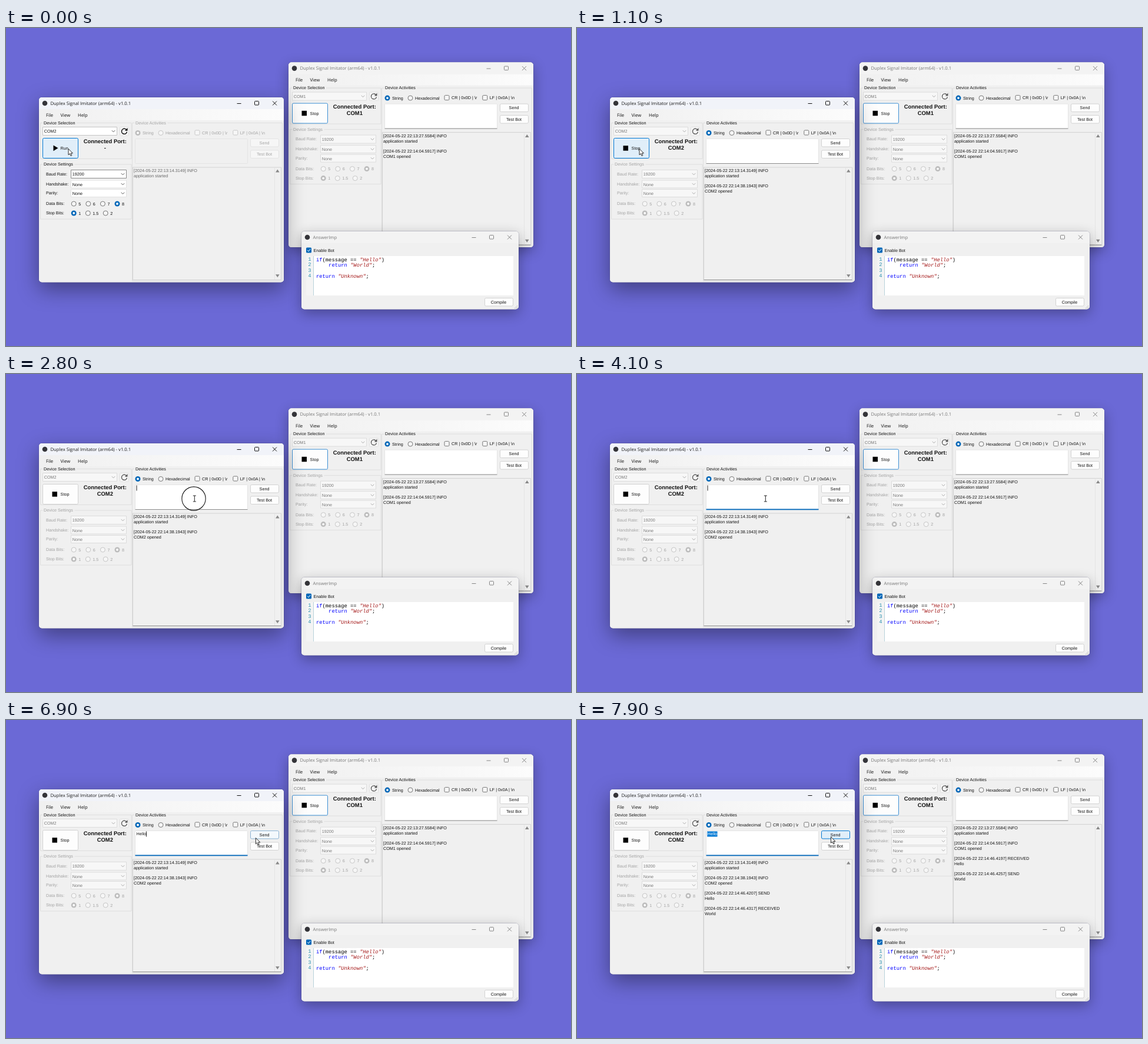
An HTML page with a canvas that plays this animation: 960 by 541 pixels, repeating every 8 s.

```html
<!DOCTYPE html>
<html lang="en">
<head>
<meta charset="utf-8">
<title>Serial port demo</title>
<style>
html, body { margin: 0; width: 100%; height: 100%; overflow: hidden; background: #6b69d6; }
canvas { display: block; }
</style>
</head>
<body>
<canvas id="stage" width="960" height="541"></canvas>
<script>
const c = document.getElementById('stage').getContext('2d');
c.textRendering = 'geometricPrecision';
const LOOP = 8000;
const UI = '7.2px "Liberation Sans", Arial, sans-serif';
const BOLD = 'bold 9.4px "Liberation Sans", Arial, sans-serif';
const TITLE = '7.7px "Open Sans", sans-serif';
const CODE = '8.8px "Liberation Mono", monospace';
const BLUE = '#0067b8', OFF = '#a3a3a3', INK = '#111';

const clamp = v => Math.max(0, Math.min(1, v));
const smooth = v => (v = clamp(v), v * v * (3 - 2 * v));
const between = (t, a, b) => t >= a && t < b;

function text(s, x, y, color = INK, font = UI, align = 'left') {
  c.font = font;
  c.fillStyle = color;
  c.textAlign = align;
  c.fillText(s, x, y);
}

function rect(x, y, w, h, color) {
  c.fillStyle = color;
  c.fillRect(x, y, w, h);
}

function box(x, y, w, h, fill, stroke, r = 0) {
  c.beginPath();
  c.roundRect(x, y, w, h, r);
  if (fill) { c.fillStyle = fill; c.fill(); }
  if (stroke) { c.strokeStyle = stroke; c.lineWidth = 1; c.stroke(); }
}

function line(color, width, ...p) {
  c.beginPath();
  for (let i = 0; i < p.length; i += 2) c.lineTo(p[i], p[i + 1]);
  c.strokeStyle = color;
  c.lineWidth = width;
  c.stroke();
}

function shape(fill, ...p) {
  c.beginPath();
  for (let i = 0; i < p.length; i += 2) c.lineTo(p[i], p[i + 1]);
  c.closePath();
  c.fillStyle = fill;
  c.fill();
}

function circle(x, y, r, fill, stroke, width = 1) {
  c.beginPath();
  c.arc(x, y, r, 0, 7);
  if (fill) { c.fillStyle = fill; c.fill(); }
  if (stroke) { c.strokeStyle = stroke; c.lineWidth = width; c.stroke(); }
}

function frame(x, y, w, h, title, active) {
  c.save();
  c.shadowColor = active ? 'rgba(0,0,0,.4)' : 'rgba(0,0,0,.32)';
  c.shadowBlur = active ? 36 : 22;
  c.shadowOffsetY = active ? 12 : 7;
  box(x, y, w, h, '#f0f0f0', null, 5);
  c.restore();
  box(x - .2, y - .2, w + .4, h + .4, null, 'rgba(70,70,110,.3)', 5);
  box(x, y, w, h, '#f0f0f0', null, 5);
  box(x, y, w, 20, active ? '#f1f3f9' : '#f3f3f3', null, [5, 5, 0, 0]);
  const ink = active ? INK : '#858585', b = x + w;
  circle(x + 10, y + 10, 4.3, '#35353a');
  text(title, x + 19.5, y + 12.8, active ? '#1a1a1a' : '#777', TITLE);
  line(ink, 1, b - 79.5, y + 10.5, b - 72.5, y + 10.5);
  box(b - 49.5, y + 6.5, 7, 6.5, null, ink, 1);
  line(ink, 1, b - 19, y + 6.5, b - 12, y + 13.5);
  line(ink, 1, b - 12, y + 6.5, b - 19, y + 13.5);
}

function group(x, y, w, h, label, on = true) {
  box(x, y, w, h, null, '#dedede');
  c.font = UI;
  rect(x + 4, y - 3, c.measureText(label).width + 4, 6, '#f0f0f0');
  text(label, x + 5.5, y + 2.3, on ? INK : OFF);
}

function chevron(x, y, on) {
  line(on ? '#555' : '#aaa', 1, x - 2.7, y - 1.3, x, y + 1.4, x + 2.7, y - 1.3);
}

function combo(x, y, w, h, value, on, border) {
  box(x, y, w, h, on ? '#fff' : '#f7f7f7', on ? border : '#dcdcdc');
  text(value, x + 2.3, y + 9.5, on ? INK : '#777');
  chevron(x + w - 6, y + h / 2, on);
}

function radio(x, y, label, checked, on = true) {
  if (checked) {
    circle(x, y, 4.5, on ? BLUE : '#bdbdbd');
    circle(x, y, 1.9, '#fff');
  } else circle(x, y, 4, '#f6f6f6', on ? '#777' : '#c6c6c6');
  text(label, x + 8, y + 2.7, on ? INK : OFF);
}

function check(x, y, label, on) {
  box(x - 4, y - 4, 8, 8, '#f7f7f7', on ? '#777' : '#c6c6c6', 1.5);
  text(label, x + 8, y + 2.7, on ? INK : OFF);
}

function button(x, y, w, h, label, on = true, fill = '#fdfdfd', border = '#d2d2d2') {
  box(x, y, w, h, on ? fill : '#f6f6f6', on ? border : '#e3e3e3', 2);
  if (label) text(label, x + w / 2 - .5, y + h / 2 + 2.6, on ? INK : OFF, UI, 'center');
}

// Coordinates are those of the left window; dx, dy move the whole window.
function emulator(dx, dy, s) {
  c.save();
  c.translate(dx, dy);
  const open = s.open, idle = !open;
  frame(56, 118, 416, 314.5, 'Duplex Signal Imitator (arm64) - v1.0.1', s.active);
  const strip = c.createLinearGradient(56, 0, 472, 0);
  strip.addColorStop(0, '#f0f0f0');
  strip.addColorStop(1, '#fcfcfc');
  rect(56, 138, 416, 19, strip);
  [['File', 68], ['View', 92.5], ['Help', 122]].forEach(([m, x]) => text(m, x, 150.8, INK, TITLE));

  group(58.5, 161.5, 154.5, 61, 'Device Selection');
  combo(62.5, 168.5, 126, 14, s.port, idle, '#c4c4c4');
  box(193.5, 168.5, 15, 14.5, '#f6f6f6', '#e0e0e0', 1);
  const ink = idle ? '#000' : '#555';
  c.beginPath();
  c.arc(201, 175.8, 4.5, .2, 5.5);
  c.strokeStyle = ink;
  c.lineWidth = 1.4;
  c.stroke();
  shape(ink, 206.5, 170, 206.5, 174.8, 201.8, 174.8);

  button(62.5, 187.5, 60, 34, '', true, s.runFill, s.runBorder);
  if (open) rect(78.5, 200.2, 8.5, 8.5, '#000');
  else shape('#000', 80.5, 199.5, 88.5, 204.3, 80.5, 209.2);
  text(open ? 'Stop' : 'Run', 92.6, 207.3);
  text('Connected Port:', 168.3, 196.4, INK, BOLD, 'center');
  text(open ? s.port : '-', 168.3, 207.2, INK, BOLD, 'center');

  group(58.5, 232, 154.5, 93, 'Device Settings', idle);
  [['Baud Rate:', 250.8], ['Handshake:', 267.7], ['Parity:', 283.2],
   ['Data Bits:', 301.3], ['Stop Bits:', 317.2]]
    .forEach(([l, y]) => text(l, 68, y, idle ? INK : OFF));
  combo(110.5, 241.5, 94, 14, '19200', idle, '#8a8a8a');
  combo(110.5, 259, 94, 13, 'None', idle, '#e2e2e2');
  combo(110.5, 274.5, 94, 13, 'None', idle, '#e2e2e2');
  [5, 6, 7, 8].forEach((n, i) => radio(115.2 + 24.6 * i, 299, n, n === 8, idle));
  radio(115.2, 315, '1', true, idle);
  radio(139.3, 315, '1.5', false, idle);
  radio(169.2, 315, '2', false, idle);

  group(214.5, 161.5, 255, 269, 'Device Activities', open);
  radio(224, 178.5, 'String', true, open);
  radio(263, 178.5, 'Hexadecimal', false, open);
  check(325, 178, 'CR | 0x0D | \\r', open);
  check(389.8, 178, 'LF | 0x0A | \\n', open);

  box(219.5, 188.5, 191, 42, open ? '#fff' : '#f0f0f0', '#e4e4e4', 1);
  if (open) rect(219.5, s.focus ? 229.5 : 230, 191, s.focus ? 1.8 : 1, s.focus ? BLUE : '#8c8c8c');
  if (s.selected) rect(221.2, 189.5, 17.3, 9, '#0078d4');
  text(s.message, 221.6, 196.4, s.selected ? '#fff' : INK);
  if (s.caret) {
    const x = 222 + c.measureText(s.message).width;
    line('#000', .9, x, 189.5, x, 198.5);
  }
  button(415.5, 188.5, 48, 13.5, 'Send', open, s.sendFill, s.sendBorder);
  button(415.5, 208, 48, 13.5, 'Test Bot', open);

  box(215.5, 237, 252, 191.5, '#f0f0f0', '#d2d2d2');
  line(open ? '#8c8c8c' : '#d0d0d0', 1, 215.5, 428.5, 467.5, 428.5);
  line('#e4e4e4', 1, 456.5, 238, 456.5, 428);
  shape('#888', 458, 245.5, 464.6, 245.5, 461.3, 240.5);
  shape('#888', 458, 419.2, 464.6, 419.2, 461.3, 424.2);
  s.log.forEach(([time, kind, body], i) => {
    const y = 245.2 + 26 * i, color = open ? INK : '#666';
    text(`[2024-05-22 22:${time}] ${kind}`, 217, y, color);
    text(body, 217, y + 8.7, color);
  });
  c.restore();
}

function botWindow() {
  frame(502, 346, 369, 132.5, 'AnswerImp', false);
  box(510, 373.5, 9, 9, BLUE, null, 1.5);
  line('#fff', 1, 512, 378, 514, 380, 517.3, 376);
  text('Enable Bot', 522.5, 380.8);
  rect(523, 388, 339, 67, '#fff');
  rect(510, 388, 12, 67, '#f4f4f4');
  line('#b9d2da', 1, 522.5, 388, 522.5, 455);
  const code = [
    [['if', '#00f'], ['(message == ', '#000'], ['"Hello"', '#a31515'], [')', '#000']],
    [['    return ', '#00f'], ['"World"', '#a31515'], [';', '#000']],
    [],
    [['return ', '#00f'], ['"Unknown"', '#a31515'], [';', '#000']]
  ];
  code.forEach((parts, i) => {
    const y = 396.8 + 9.35 * i;
    text(i + 1, 518.5, y - .7, '#2b91af', CODE, 'right');
    let x = 527;
    for (const [s, color] of parts) {
      text(s, x, y, color, (s[0] === '"' ? 'italic ' : '') + CODE);
      x += c.measureText(s).width;
    }
  });
  button(813.5, 459.5, 48, 13.5, 'Compile');
  for (let i = 0; i < 3; i++)
    for (let j = 0; j <= i; j++) rect(868 - 2 * j, 472 + 2 * i, 1, 1, '#b0b0b0');
}

function tooltip() {
  c.save();
  c.shadowColor = 'rgba(0,0,0,.45)';
  c.shadowBlur = 3;
  c.shadowOffsetX = c.shadowOffsetY = 2;
  rect(431.5, 211.5, 85.5, 13.5, '#f9f9f9');
  c.restore();
  box(431.5, 211.5, 85.5, 13.5, null, '#bbb');
  text('Click to send message', 434.5, 220.8, '#3c3c3c', TITLE);
}

function pointer(x, y, beam) {
  if (beam) {
    line('#222', 1, x - 2.5, y - 5, x + 2.5, y - 5);
    line('#222', 1, x, y - 5, x, y + 5);
    line('#222', 1, x - 2.5, y + 5, x + 2.5, y + 5);
    return;
  }
  const d = [0, 0, 0, 10.3, 2.4, 8.2, 4, 12, 5.8, 11.2, 4.2, 7.5, 7.4, 7.5]
    .map((v, i) => v + (i % 2 ? y : x));
  shape('#fff', ...d);
  line('#111', .9, ...d, x, y);
}

function ring(x, y, age) {
  const k = age / 300;
  if (k <= 0 || k >= 1) return;
  c.globalAlpha = Math.min(1, 1.5 * (1 - k));
  circle(x, y, 36 * (1 - (1 - k) ** 2), null, '#111', 1.1);
  c.globalAlpha = 1;
}

const rightLog = [
  ['13:27.5584', 'INFO', 'application started'],
  ['14:04.5917', 'INFO', 'COM1 opened'],
  ['14:46.4197', 'RECEIVED', 'Hello'],
  ['14:46.4257', 'SEND', 'World']
];
const leftLog = [
  ['13:14.3149', 'INFO', 'application started'],
  ['14:38.1943', 'INFO', 'COM2 opened'],
  ['14:46.4207', 'SEND', 'Hello'],
  ['14:46.4317', 'RECEIVED', 'World']
];
const KEYS = [4900, 5100, 5400, 5500, 5800];
const CARET = [[2700, 3500], [4100, 4600], [4900, 6300], [6800, 7300]];

const PLAIN = [253, 253, 253], HOVER = [224, 238, 249], PRESS = [204, 228, 247];
const EDGE = [210, 210, 210], ACCENT = [0, 120, 212];
const mix = (a, b, k) => `rgb(${a.map((v, i) => Math.round(v + (b[i] - v) * k))})`;

function draw(t) {
  const open = t >= 1000, sent = t >= 7700;
  const out = smooth((t - 2200) / 300), go = smooth((t - 2100) / 600), back = smooth((t - 6400) / 600);
  let x = 106 + 214.3 * go + 112.2 * back, y = 205.5 + 6.5 * go - 12.3 * back;
  if (t >= 7500) { x -= 1; y -= .8; }
  const hover = clamp((t - 6850) / 150);

  rect(0, 0, 960, 541, '#6b69d6');
  emulator(424, -59.4, {
    port: 'COM1', open: true, message: '', log: rightLog.slice(0, sent ? 4 : 2),
    runBorder: '#3c8fd4'
  });
  botWindow();
  emulator(0, 0, {
    port: 'COM2', active: true, open,
    runFill: between(t, 700, 1000) ? mix(HOVER, PRESS, clamp((t - 650) / 100)) : mix(HOVER, PLAIN, out),
    runBorder: mix(ACCENT, EDGE, out),
    focus: t >= 2900,
    message: 'Hello'.slice(0, KEYS.filter(k => t >= k).length),
    caret: CARET.some(([a, b]) => between(t, a, b)),
    selected: sent,
    sendFill: between(t, 7500, 7700) ? mix(HOVER, PRESS, 1) : mix(PLAIN, HOVER, hover),
    sendBorder: mix(EDGE, ACCENT, hover),
    log: leftLog.slice(0, sent ? 4 : open ? 2 : 1)
  });
  if (between(t, 7300, 7500)) tooltip();
  ring(106, 205.5, t - 800);
  ring(319, 212, t - 2700);
  ring(432, 199.5, t - 7500);
  if (!between(t, 4900, 6450)) pointer(x, y, x > 220 && x < 410);
}

function tick(now) {
  draw(now % LOOP);
  requestAnimationFrame(tick);
}
draw(0);
requestAnimationFrame(tick);
</script>
</body>
</html>
```
